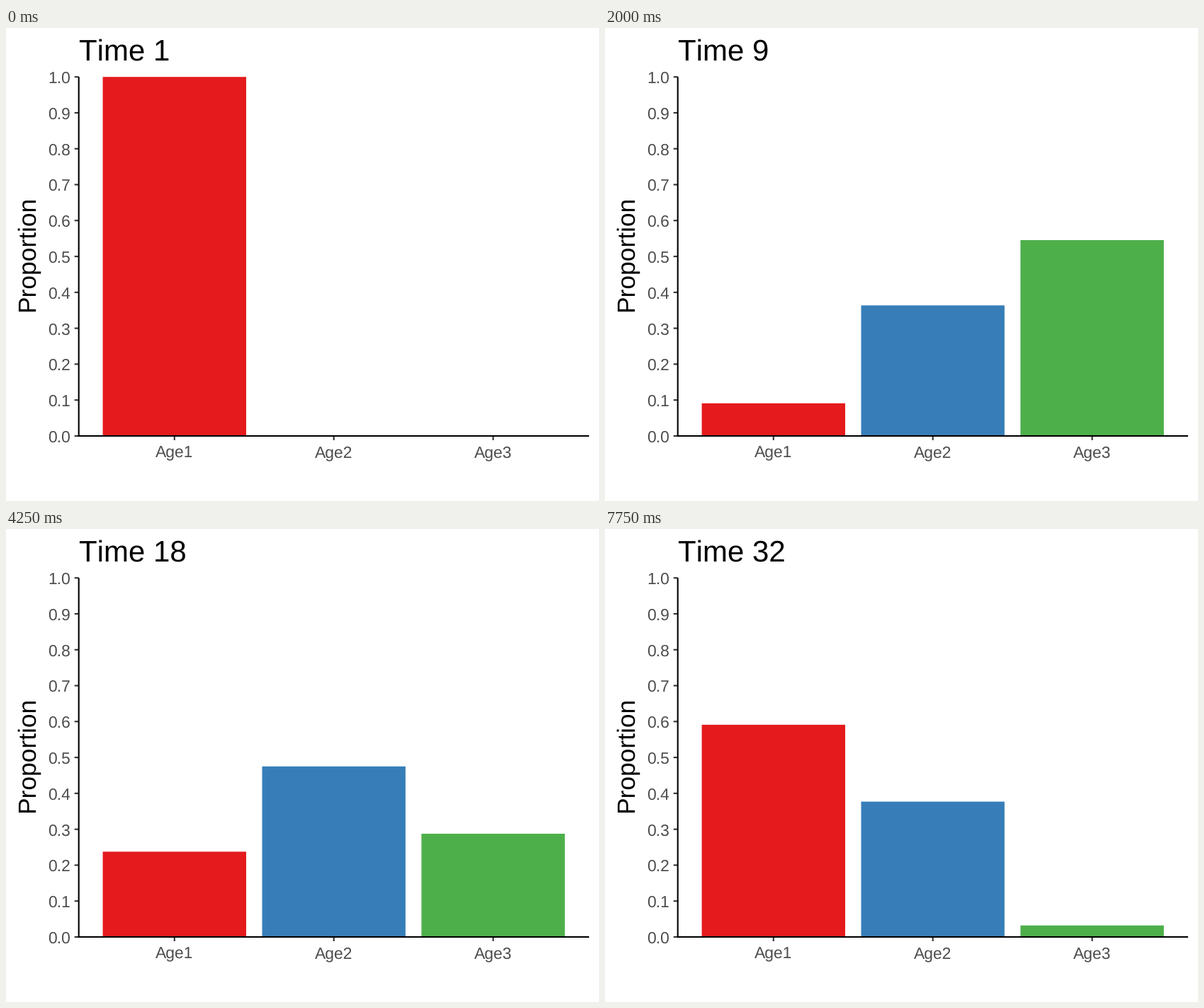
A matplotlib script that plays this animation: 837x669 px, repeating every 8000 ms.

```python
import numpy as np
import matplotlib.pyplot as plt
from matplotlib.animation import FuncAnimation

W, H, DPI = 837, 669, 64
PT = 72 / DPI  # points per pixel
STEPS, INTERVAL = 32, 250

plt.rcParams["font.family"] = "Liberation Sans"
plt.rcParams["text.kerning_factor"] = 6  # effectively no kerning
plt.rcParams["text.hinting"] = "none"

# Panel geometry in pixels, y pointing down
LEFT, RIGHT, TOP, BASE = 102.7, 823, 69.2, 577
BAR_X, BAR_STEP, BAR_W = 136.6, 224.9, 202.4
TICK = 6
COLORS = ["#E41A1C", "#377EB8", "#4DAF4A"]
GREY = "#4D4D4D"

# Stage-structured population: births from age 3, survival between ages
PROJECTION = np.array([[0, 0, 10],
                       [0.6, 0, 0],
                       [0, 0.3, 0.1]])
START = np.array([20, 0, 0])


def proportions(step):
    counts = np.round(np.linalg.matrix_power(PROJECTION, step) @ START)
    return counts / counts.sum()


fig = plt.figure(figsize=(W / DPI, H / DPI), dpi=DPI, facecolor="white")
ax = fig.add_axes([0, 0, 1, 1])
ax.set_xlim(0, W)
ax.set_ylim(H, 0)
ax.axis("off")


def label(x, y, text, size, color="black", **kw):
    return ax.text(x, y, text, fontsize=size * PT, color=color,
                   va="baseline", **kw)


def line(xs, ys, color="black", width=2.1):
    ax.plot(xs, ys, color=color, lw=width * PT,
            solid_capstyle="butt", snap=False, zorder=3)


bars = []
for i, color in enumerate(COLORS):
    x = BAR_X + i * BAR_STEP
    bar = plt.Rectangle((x, BASE), BAR_W, 0, facecolor=color,
                        linewidth=0, snap=False)
    bars.append(ax.add_patch(bar))
    mid = x + BAR_W / 2
    line([mid, mid], [BASE, BASE + TICK], "#333333")
    label(mid, 607, f"Age{i + 1}", 22.9, GREY, ha="center")

for i in range(11):
    y = BASE - (BASE - TOP) * i / 10
    line([LEFT - TICK, LEFT], [y, y], "#333333")
    label(91.3, y + 8.7, f"{i / 10:.1f}", 22.9, GREY, ha="right")

line([LEFT, LEFT], [TOP, BASE + 1])
line([LEFT - 1, RIGHT], [BASE, BASE])

label(39.5, 319.7, "Proportion", 35.4, ha="center",
      rotation=90, rotation_mode="anchor")
title = label(103, 46, "", 42)


def draw(step):
    for bar, share in zip(bars, proportions(step)):
        bar.set_height(-share * (BASE - TOP))
    title.set_text(f"Time {step + 1}")
    return [*bars, title]


anim = FuncAnimation(fig, draw, frames=STEPS, interval=INTERVAL,
                     repeat=True, repeat_delay=0)
plt.show()
```
